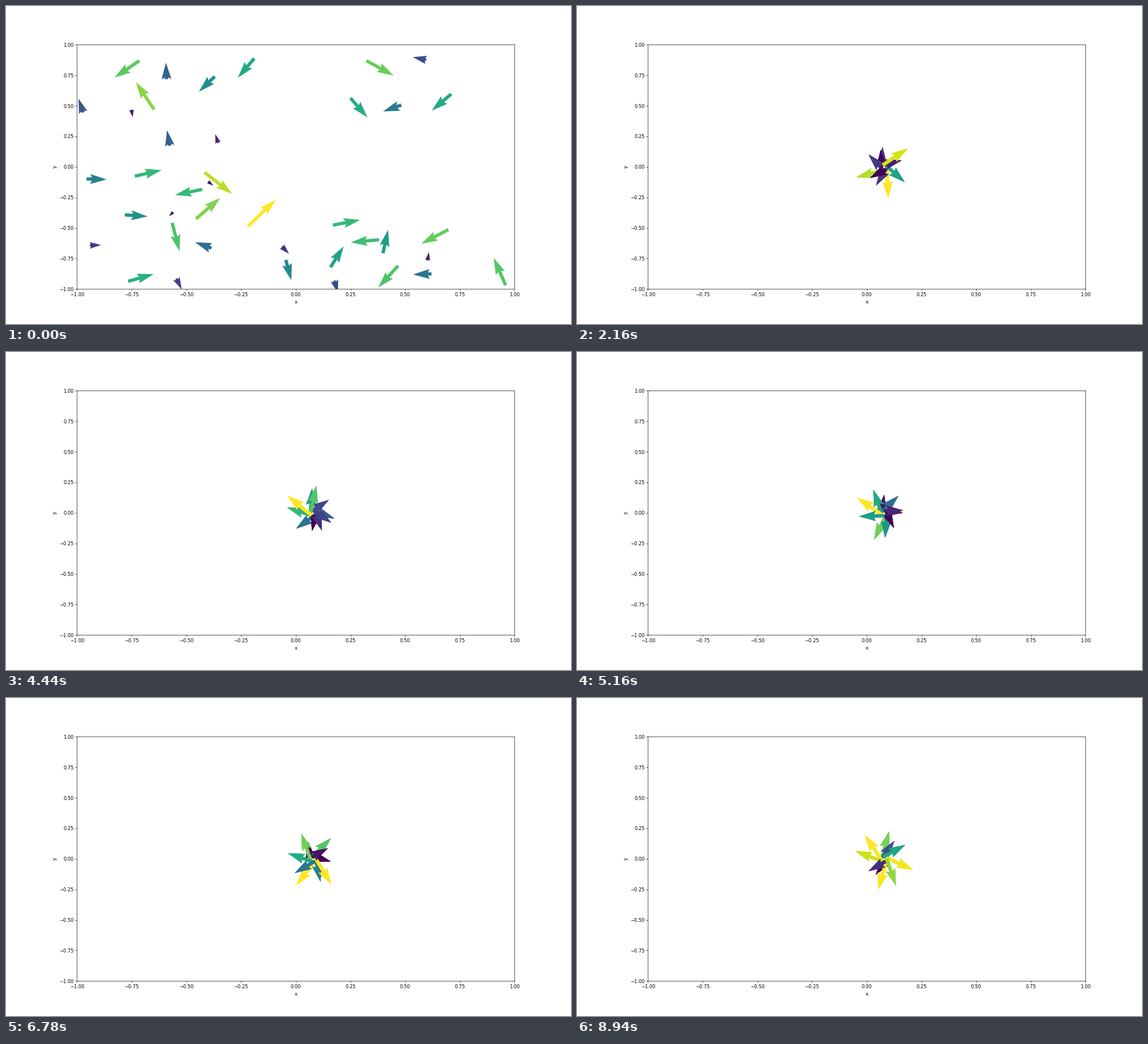
Write a matplotlib script that moves like this. It is 998 px wide and 561 px high and loops after 9000 ms.

```python
import numpy as np
import matplotlib.pyplot as plt
from matplotlib.animation import FuncAnimation

W, H, DPI = 998, 561, 60
FRAMES, STEP = 150, 60
LEFT, RIGHT, TOP, BOTTOM = 125.4, 898.4, 68.2, 499.4
GATHER = 17               # frames until the swarm has closed up
TURN = 40                 # clockwise turn per frame, degrees
RING = 4.5                # radius of the mill, pixels
SHORT, LONG = 31, 54.5    # range of arrow lengths in the mill
SPOKES = 10
CENTRE = 542 - 284j       # screen points are x - y*1j, in pixels

rng = np.random.default_rng(7)

# The long arrows of the opening: start, then reach to the right and down.
LEADERS = np.array([
    (235, 96, -44, 30), (261, 182, -32, -48), (438, 92, -29, 34),
    (636, 96, 48, 26), (608, 162, 30, 34), (346, 323, -48, 10),
    (350, 293, 49, 38), (335, 375, 43, -37), (427, 388, 49, -47),
    (293, 382, 13, 50), (577, 386, 48, -9), (692, 458, -35, 38),
    (781, 394, -48, 25), (882, 492, -21, -48)])


def scatter(n, x0, x1, y0, y1):
    """Spread n points evenly but irregularly over a box."""
    i = np.arange(1, n + 1)
    x, y = 0.7549 * i % 1, 0.5698 * i % 1
    return x0 + (x1 - x0) * x - 1j * (y0 + (y1 - y0) * y)


# Shorter arrows: down the left side, along the bottom and at the top right.
followers = np.concatenate([scatter(15, 130, 430, 70, 490),
                            scatter(8, 480, 830, 400, 485),
                            scatter(3, 650, 830, 75, 215)])
n = len(followers)
hops = np.linspace(10, 50, n) * np.exp(2j * np.pi * rng.random(n))

TAILS = np.concatenate([followers, LEADERS[:, :2] @ [1, -1j]])
REACH = np.concatenate([rng.permutation(hops), LEADERS[:, 2:] @ [1, -1j]])
N = len(TAILS)

# Each spoke of the mill sways and changes speed at its own pace.
SPOKE = rng.permutation(SPOKES) * 360 / SPOKES
PHASE = rng.uniform(0, 2 * np.pi, SPOKES)
PACE = rng.uniform(0.2, 0.6, SPOKES)
SLOT = np.arange(N) * SPOKES // N


def mill(t):
    """Tails and arrows of the swarm circling its centre."""
    sway = 15 * np.sin(0.6 * PACE * t + 2 * PHASE)
    head = np.exp(1j * np.radians(SPOKE + sway - TURN * t))
    level = np.sin(PACE * t + PHASE)
    level = (level - level.min()) / np.ptp(level)
    size = SHORT + (LONG - SHORT) * level
    return (CENTRE + RING * 1j * head)[SLOT], (size * head)[SLOT]


def swarm(t):
    tails, arrows = mill(t)
    if t >= GATHER:
        return tails, arrows
    s = t / GATHER
    ease = (1 - s * s) ** 2
    slope = -4 * s * (1 - s * s) / GATHER
    drift = 0.5 * REACH
    free = TAILS + drift * t
    speed = slope * (free - CENTRE) + ease * drift + (1 - ease) * 0.07 * arrows
    speed *= np.abs(REACH).mean() / np.abs(speed).mean()
    return tails + (free - tails) * ease, speed


def to_data(z):
    """Pixel centres to axes coordinates."""
    x = 2 * (z.real + 0.5 - LEFT) / (RIGHT - LEFT) - 1
    y = 1 - 2 * (0.5 - z.imag - TOP) / (BOTTOM - TOP)
    return np.column_stack([x, y])


fig = plt.figure(figsize=((W + 1e-4) / DPI, (H + 1e-4) / DPI), dpi=DPI,
                 facecolor="white")
ax = fig.add_axes([LEFT / W, 1 - BOTTOM / H,
                   (RIGHT - LEFT) / W, (BOTTOM - TOP) / H])
ticks = np.linspace(-1, 1, 9)
ax.set(xlim=(-1, 1), ylim=(-1, 1), xticks=ticks, yticks=ticks,
       xlabel="x", ylabel="y")

quiver = ax.quiver(*to_data(TAILS).T, REACH.real, REACH.imag, np.zeros(N),
                   cmap="viridis", clim=(0, 1), units="dots",
                   scale_units="dots", scale=1, width=5.8)


def update(t):
    tails, arrows = swarm(t)
    size = np.abs(arrows)
    quiver.set_offsets(to_data(tails))
    quiver.set_UVC(arrows.real, arrows.imag,
                   (size - size.min()) / np.ptp(size))
    return quiver,


anim = FuncAnimation(fig, update, frames=FRAMES, interval=STEP,
                     repeat=True, repeat_delay=0)
plt.show()
```
